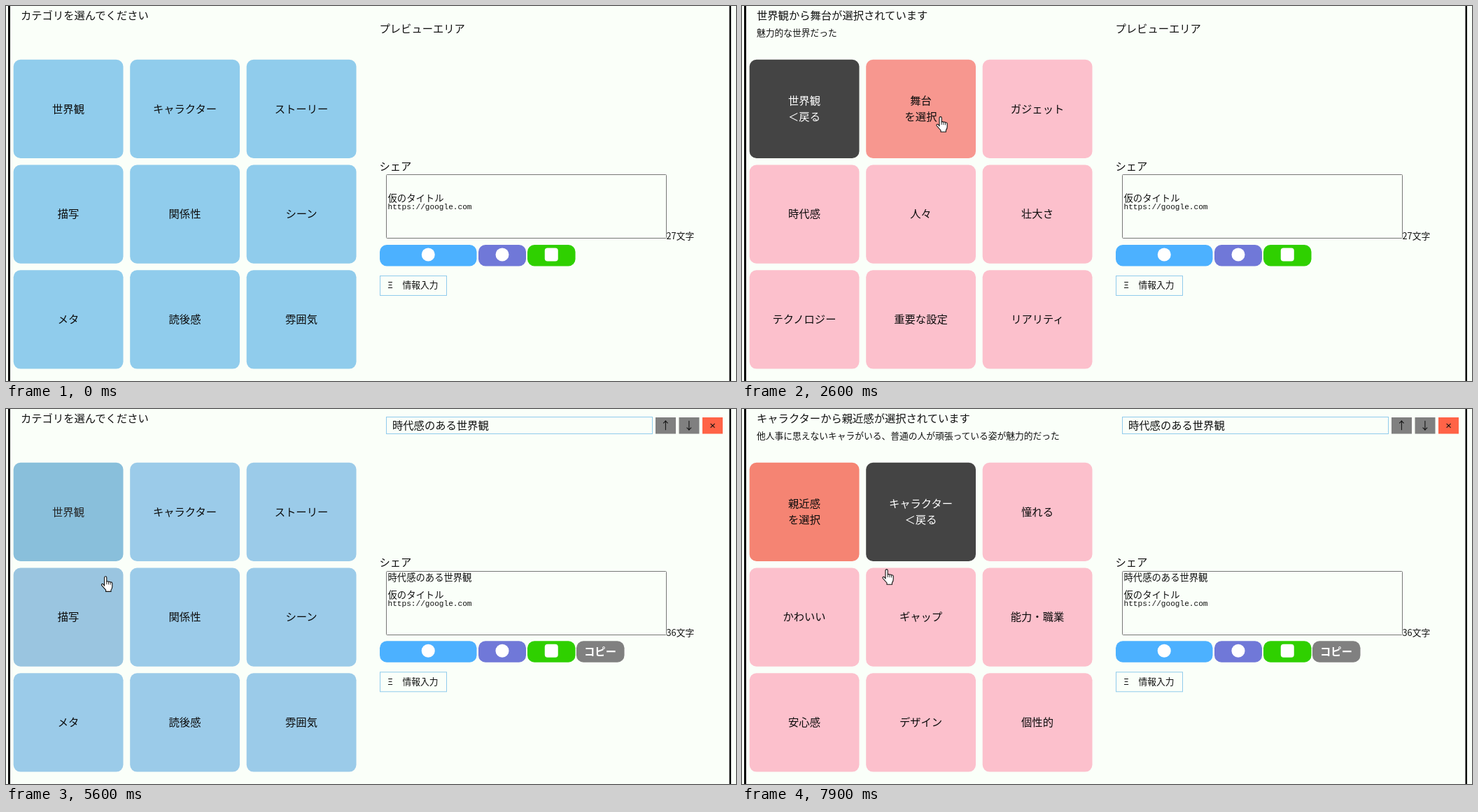
Animation, 1043 px wide and 537 px high, one loop 8 s. Source, as an HTML page:

```html
<!DOCTYPE html>
<html lang="ja">
<head>
<meta charset="utf-8">
<title>感想メーカー</title>
<style>
  html, body { margin: 0; width: 100%; height: 100%; overflow: hidden; background: #fafff9; }
  svg { display: block; width: 100vw; height: 100vh; }
  text { font-family: "Noto Sans CJK JP", "Noto Sans CJK", "Noto Sans", sans-serif; fill: #111; }
</style>
</head>
<body>
<svg id="stage" viewBox="0 0 1043 537" xmlns="http://www.w3.org/2000/svg"></svg>
<script>
const LOOP = 8000, STEP = 100;
const BODY = 15.3, SMALL = 12.75, AREA = 13.33;
const stage = document.getElementById('stage');

const FILL = { c: [144, 204, 236], p: [252, 192, 204], s: [245, 132, 115], d: [68, 68, 68] };
const INK = { c: [12, 12, 12], p: [12, 12, 12], s: [12, 12, 12], d: [255, 255, 255] };
const SECOND_LINE = { s: 'を選択', d: '＜戻る' };

const categories = '世界観 キャラクター ストーリー 描写 関係性 シーン メタ 読後感 雰囲気'.split(' ');
const worlds = '世界観 舞台 ガジェット 時代感 人々 壮大さ テクノロジー 重要な設定 リアリティ'.split(' ');
const people = '親近感 キャラクター 憧れる かわいい ギャップ 能力・職業 安心感 デザイン 個性的'.split(' ');

// at: when the labels switch; fade: when the colours start to change
const states = [
  { at: 0, fade: 0, kinds: 'ccccccccc', labels: categories,
    title: 'カテゴリを選んでください', sub: '' },
  { at: 1500, fade: 1412, kinds: 'dpppppppp', labels: worlds,
    title: '世界観からふさわしいものを選んでください',
    sub: '物語の舞台や背景が印象的だったときに。 重要アイテムなども含まれます' },
  { at: 2600, fade: 2520, kinds: 'dsppppppp', labels: worlds,
    title: '世界観から舞台が選択されています', sub: '魅力的な世界だった' },
  { at: 3600, fade: 3526, kinds: 'dpppspppp', labels: worlds,
    title: '世界観から人々が選択されています', sub: '背景に息づく人々が魅力的だった' },
  { at: 4500, fade: 4425, kinds: 'dppsppppp', labels: worlds,
    title: '世界観から時代感が選択されています',
    sub: '文化や人々の気風、考え方などが時代感に即していた' },
  { at: 5400, fade: 5350, kinds: 'ccccccccc', labels: categories,
    title: 'カテゴリを選んでください', sub: '' },
  { at: 6300, fade: 6317, kinds: 'pdppppppp', labels: people,
    title: 'キャラクターからふさわしいものを選んでください',
    sub: '誰か特定の登場人物に対する感想' },
  { at: 7500, fade: 7425, kinds: 'sdppppppp', labels: people,
    title: 'キャラクターから親近感が選択されています',
    sub: '他人事に思えないキャラがいる、普通の人が頑張っている姿が魅力的だった' }
];
const ADDED_AT = 5400;

const pointerPath = [
  [100, 821, 93], [200, 752, 103], [400, 500, 130], [600, 190, 142], [800, 68, 143],
  [900, 68, 143], [1200, 61, 168], [1600, 61, 168], [2000, 277, 158],
  [2800, 277, 158], [3100, 224, 244], [3900, 224, 244], [4300, 100, 256],
  [5500, 100, 256], [6000, 278, 172], [6700, 278, 172], [7200, 134, 177],
  [7600, 134, 177], [7800, 221, 174], [7900, 200, 229]
];

function add(name, attrs = {}, parent = stage) {
  const node = document.createElementNS('http://www.w3.org/2000/svg', name);
  for (const key in attrs) node.setAttribute(key, attrs[key]);
  return parent.appendChild(node);
}
function box(x, y, w, h, attrs, parent) {
  return add('rect', { x, y, width: w, height: h, ...attrs }, parent);
}
function frame(x, y, w, h, color, parent) {
  return box(x + .5, y + .5, w - 1, h - 1, { fill: 'none', stroke: color }, parent);
}
// cy is the middle of the ideographic box
function label(str, x, cy, size, attrs, parent) {
  const node = add('text', { x, y: cy + size * .38, 'font-size': size, ...attrs }, parent);
  node.textContent = str;
  return node;
}
const centred = { 'text-anchor': 'middle' };

// Page edges and headings
box(3, 0, 3, 537, { fill: '#000' });
box(1033.5, 0, 2.5, 537, { fill: '#000' });
const title = label('', 21, 13.5, BODY);
const sub = label('', 21, 38, SMALL);

// Category tiles
const tiles = categories.map((_, i) => {
  const x = 10.7 + (i % 3) * 166.5, y = 76.7 + Math.floor(i / 3) * 150.8;
  const cx = x + 78.3, cy = y + 70;
  return {
    cy,
    rect: box(x, y, 156.8, 141.3, { rx: 10 }),
    first: label('', cx, cy, BODY, centred),
    second: label('', cx, cy + 11.5, BODY, centred)
  };
});

// Preview
const emptyPreview = label('プレビューエリア', 533.5, 32.5, BODY);
const preview = add('g');
frame(543, 11, 381, 25, '#90cbec', preview);
label('時代感のある世界観', 552, 23.5, BODY, {}, preview);
[['↑', 928, '#808080'], ['↓', 961.5, '#808080'], ['×', 995, '#ff6347']].forEach(([mark, x, fill]) => {
  box(x, 12, 29, 23.5, { fill }, preview);
  label(mark, x + 14.5, 23.5, BODY, { ...centred, style: 'font-family:"Noto Sans","Noto Sans CJK JP",sans-serif' }, preview);
});

// Share area
const share = add('g');
label('シェア', 533.5, 229, BODY, {}, share);
[[534, 138.5, '#4cb1ff'], [675, 68, '#7078d8'], [745, 68.5, '#2fd000']].forEach(([x, w, fill], i) => {
  box(x, 342, w, 30.5, { rx: 10, fill }, share);
  if (i < 2) add('circle', { cx: x + w / 2, cy: 356, r: 9.5, fill: '#fff' }, share);
  else box(x + w / 2 - 9.5, 346.5, 19, 19, { rx: 4, fill: '#fff' }, share);
});
const copy = add('g', {}, share);
box(815, 342, 68.5, 30.5, { rx: 10, fill: '#808080' }, copy);
label('コピー', 849, 357, BODY, { ...centred, style: 'fill:#fff;font-weight:700' }, copy);
frame(534, 386, 96, 29, '#90cbec', share);
label('Ξ', 545.5, 399.5, SMALL, { style: 'font-family:"Noto Sans",sans-serif' }, share);
label('情報入力', 566.5, 399.5, SMALL, {}, share);

const area = add('g');
box(543.5, 241.5, 400, 91, { fill: 'none', stroke: '#777', rx: 1 }, area);
const quote = label('時代感のある世界観', 545.5, 250, AREA, {}, area);
label('仮のタイトル', 545.5, 275, AREA, {}, area);
label('https://google.com', 545.5, 287.2, 11.11,
  { style: 'font-family:"Liberation Mono",monospace' }, area);
const counter = label('', 943.5, 329, SMALL, {}, area);

// Hand pointer
const pointer = add('g');
add('path', {
  d: 'M5 14V2.2a1.6 1.6 0 0 1 3.2 0V8q1.5-1 2.8.3 1.6-.8 2.6.5 2-.5 2.6 1.3V15q0 2.5-1.8 5v2.2H7V20L1.2 13.5q-.8-1.4.4-2.1 1-.5 2 .5Z',
  fill: '#fff', stroke: '#111', 'stroke-width': 1.1, 'stroke-linejoin': 'round'
}, pointer);
add('path', { d: 'M8.2 8v4M11 8.5v3.7M13.6 9v3.4', fill: 'none', stroke: '#111', 'stroke-width': .9 }, pointer);

// CSS "ease": cubic-bezier(.25, .1, .25, 1)
function ease(x) {
  if (x <= 0) return 0;
  if (x >= 1) return 1;
  const bezier = (u, a, b) => 3 * u * (1 - u) ** 2 * a + 3 * u * u * (1 - u) * b + u ** 3;
  let lo = 0, hi = 1;
  for (let i = 0; i < 20; i++) {
    const mid = (lo + hi) / 2;
    if (bezier(mid, .25, .25) < x) lo = mid; else hi = mid;
  }
  return bezier(lo, .1, 1);
}
const mix = (a, b, p) => `rgb(${a.map((v, i) => Math.round(v + (b[i] - v) * p))})`;
const show = (node, on) => node.setAttribute('visibility', on ? 'visible' : 'hidden');

function drawTiles(t) {
  const n = states.findLastIndex(s => s.at <= t);
  const now = states[n], before = states[Math.max(0, n - 1)];
  title.textContent = now.title;
  sub.textContent = now.sub;
  tiles.forEach((tile, i) => {
    const from = before.kinds[i], to = now.kinds[i];
    const p = ease((t - now.fade) / (to === 's' ? 200 : 400));
    const ink = mix(INK[from], INK[to], p);
    const extra = SECOND_LINE[to] || '';
    tile.rect.setAttribute('fill', mix(FILL[from], FILL[to], p));
    tile.first.textContent = now.labels[i];
    tile.second.textContent = extra;
    tile.first.setAttribute('y', tile.cy + BODY * .38 - (extra ? 11.5 : 0));
    tile.first.style.fill = tile.second.style.fill = ink;
  });
}

function drawPreview(added) {
  show(emptyPreview, !added);
  [preview, copy, quote].forEach(node => show(node, added));
  share.setAttribute('transform', `translate(0 ${added ? -9.7 : 0})`);
  area.setAttribute('transform', `translate(0 ${added ? -9 : 0})`);
  counter.textContent = added ? '36文字' : '27文字';
}

function drawPointer(t) {
  show(pointer, t >= pointerPath[0][0]);
  const next = pointerPath.findIndex(k => k[0] > t);
  const b = pointerPath[next < 0 ? pointerPath.length - 1 : next];
  const a = next > 0 ? pointerPath[next - 1] : b;
  const p = a === b ? 0 : (t - a[0]) / (b[0] - a[0]);
  const at = i => a[i] + (b[i] - a[i]) * p;
  pointer.setAttribute('transform', `translate(${at(1)} ${at(2)})`);
}

let drawn = -1;
function draw(time) {
  const t = Math.floor((time % LOOP) / STEP) * STEP;
  if (t !== drawn) {
    drawn = t;
    drawTiles(t);
    drawPreview(t >= ADDED_AT);
    drawPointer(t);
  }
}
const begin = performance.now();
function tick() {
  draw(Math.max(0, performance.now() - begin));
  requestAnimationFrame(tick);
}
tick();
</script>
</body>
</html>
```
